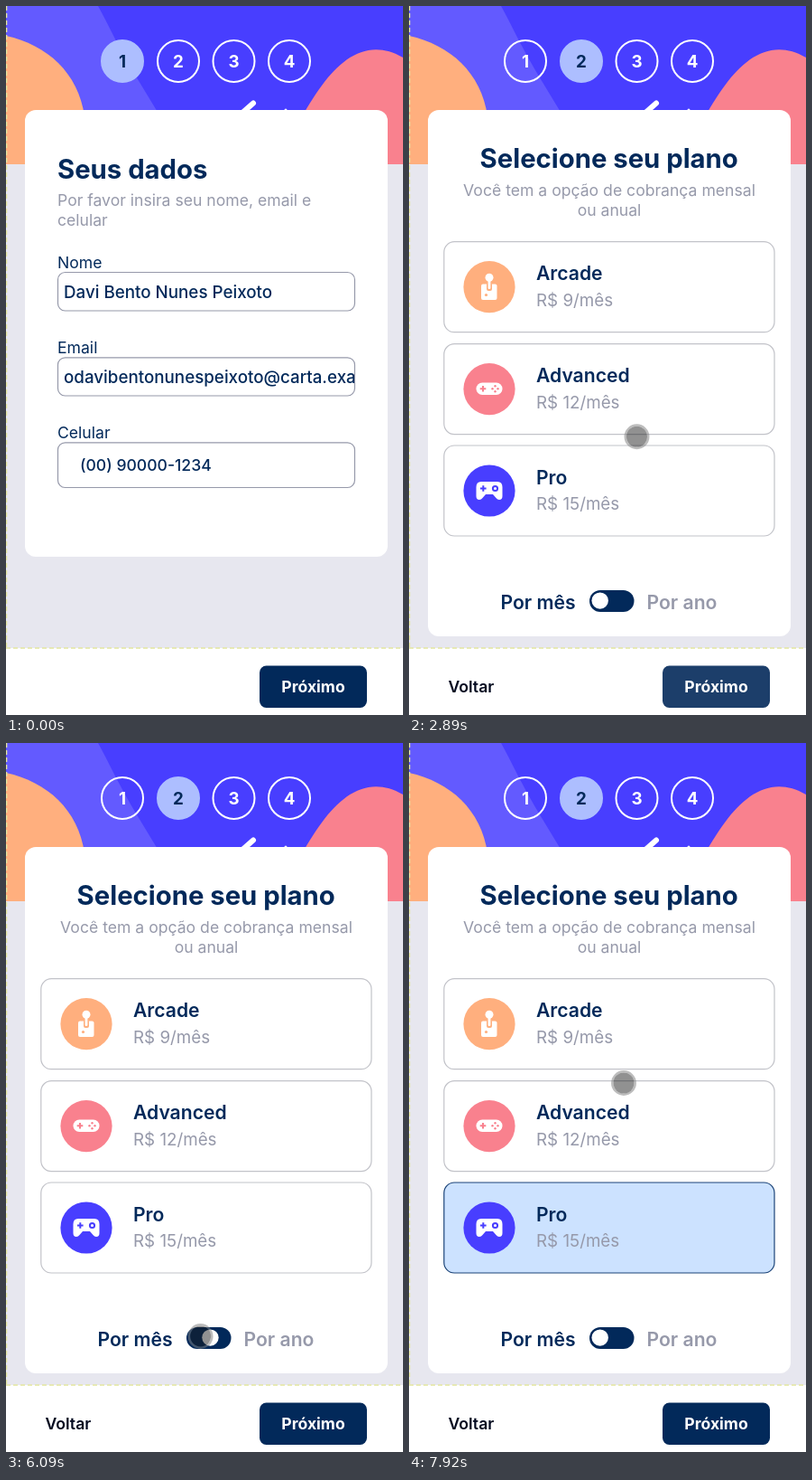
An HTML page with a canvas that plays this animation: 440 px wide and 784 px high, repeating every 8000 ms.

```html
<!DOCTYPE html>
<html lang="pt-BR">
<head>
<meta charset="utf-8">
<title>Cadastro</title>
<style>
html, body { margin: 0; width: 100%; height: 100%; overflow: hidden; background: #e7e7ef; }
canvas { display: block; width: 440px; height: 784px; }
</style>
</head>
<body>
<canvas id="stage" width="440" height="784"></canvas>
<script>
const ctx = document.getElementById('stage').getContext('2d');
const LOOP = 8000;
const NAVY = '#02295a', GRAY = '#9699aa', WHITE = '#fff';
const PEACH = '#ffaf7e', CORAL = '#f9818e', BLUE = '#483eff';

const T = { page: 1500, on: 5250, off: 6000, pick: 7400 };

// Pointer path: time, x, y
const PATH = [
  [0, 283, 800], [390, 252, 558], [630, 252, 558], [1170, 357, 744], [1260, 358, 740],
  [1480, 358, 740], [2250, 350, 737], [2350, 350, 737], [3050, 236, 427], [3170, 235, 421],
  [3690, 209, 531], [3970, 198, 562], [4050, 198, 559], [4750, 214, 648], [4850, 214, 648],
  [5130, 215, 656], [6490, 216, 656], [6880, 227, 535], [7240, 230, 519],
  [7360, 230, 519], [7920, 238, 376], [8000, 238, 376]
];

const clamp = v => Math.max(0, Math.min(1, v));
const ramp = (t, start, length) => {
  const p = clamp((t - start) / length);
  return p * p * (3 - 2 * p);
};
const mix = (a, b, p) => `rgb(${a.map((v, i) => Math.round(v + (b[i] - v) * p))})`;

function slope(i, k) {
  if (i < 1 || i > PATH.length - 2) return 0;
  const step = j => (PATH[j + 1][k] - PATH[j][k]) / (PATH[j + 1][0] - PATH[j][0]);
  const a = step(i - 1), b = step(i);
  return a * b > 0 ? 2 * a * b / (a + b) : 0;
}

// Monotone cubic interpolation
function along(t, k) {
  let i = 0;
  while (i < PATH.length - 2 && PATH[i + 1][0] <= t) i++;
  const a = PATH[i], b = PATH[i + 1], d = b[0] - a[0], p = (t - a[0]) / d, q = 1 - p;
  return a[k] * (1 + 2 * p) * q * q + b[k] * p * p * (3 - 2 * p)
    + d * p * q * (slope(i, k) * q - slope(i + 1, k) * p);
}

function text(str, x, y, size, weight = 400, color = NAVY, align = 'left') {
  ctx.font = `${weight} ${size}px Inter, sans-serif`;
  ctx.fillStyle = color;
  ctx.textAlign = align;
  ctx.fillText(str, x, y);
}

function paint(fill, stroke, width = 1.2) {
  if (fill) { ctx.fillStyle = fill; ctx.fill(); }
  if (stroke) { ctx.strokeStyle = stroke; ctx.lineWidth = width; ctx.stroke(); }
}

function box(x, y, x2, y2, r, fill, stroke, width) {
  ctx.beginPath();
  ctx.roundRect(x, y, x2 - x, y2 - y, r);
  paint(fill, stroke, width);
}

function disc(x, y, r, fill, stroke, width) {
  ctx.beginPath();
  ctx.arc(x, y, r, 0, Math.PI * 2);
  paint(fill, stroke, width);
}

function shape(path, fill, stroke, width) {
  const p = new Path2D(path);
  if (fill) { ctx.fillStyle = fill; ctx.fill(p); }
  if (stroke) { ctx.strokeStyle = stroke; ctx.lineWidth = width; ctx.stroke(p); }
}

function plus(x, y, r, color) {
  shape(`M${x - r} ${y}h${2 * r}M${x} ${y - r}v${2 * r}`, null, color, 2);
}

function backdrop() {
  ctx.fillStyle = '#e7e7ef';
  ctx.fillRect(0, 0, 440, 784);
  ctx.fillStyle = BLUE;
  ctx.fillRect(0, 0, 440, 175);
  shape('M0 0H102C112 18 126 48 146 81L203 175H0Z', '#635aff');
  shape('M0 33C46 43 80 74 87 122L92 175H0Z', PEACH);
  shape('M290 175C318 144 332 112 350 88C374 55 404 36 440 57V175Z', CORAL);
  ctx.lineCap = 'round';
  shape('M262 118L274 107.5', null, WHITE, 6);
  ctx.lineCap = 'butt';
  disc(310, 115, 1.5, WHITE);
}

function steps(active) {
  [129, 191, 252.5, 314].forEach((x, i) => {
    const on = i + 1 === active;
    disc(x, 61, 23, on ? '#adbeff' : null, on ? '#adbeff' : WHITE, 2);
    text(i + 1, x, 68, 18.77, 700, on ? NAVY : WHITE, 'center');
  });
}

function field(label, value, top, bottom, x, base, size) {
  text(label, 57, top - 4.5, 17.6);
  box(57.5, top, 386.5, bottom, 8, WHITE, GRAY);
  ctx.save();
  ctx.beginPath();
  ctx.rect(58, top, 328, bottom - top);
  ctx.clip();
  text(value, x, base, size, 500);
  ctx.restore();
}

function dataPage() {
  box(21, 115, 423, 609, 12, WHITE);
  text('Seus dados', 57, 191, 28.16 * 1.04, 700);
  text('Por favor insira seu nome, email e', 57, 221, 17.6, 400, GRAY);
  text('celular', 57, 243, 17.6, 400, GRAY);
  field('Nome', 'Davi Bento Nunes Peixoto', 294.5, 337, 64, 323, 18.77);
  field('Email', 'odavibentonunespeixoto@carta.example', 388.8, 431, 64, 417, 18.77);
  field('Celular', '(00) 90000-1234', 482.8, 532.5, 82, 514, 17.6);
}

function arcadeIcon() {
  box(80, 307.5, 97.5, 325, 2, WHITE);
  box(86, 306, 92, 315, 2, PEACH);
  box(87.6, 301, 90.4, 313, 1, WHITE);
  disc(89, 300.3, 4.5, WHITE);
  disc(85.5, 319.5, 1.6, PEACH);
}

function advancedIcon() {
  box(74.5, 416.5, 103.5, 430, 6.7, WHITE);
  plus(82, 423.2, 3.3, CORAL);
  for (const [dx, dy] of [[0, -3], [0, 3], [-3, 0], [3, 0]]) disc(95.5 + dx, 423.2 + dy, 1.2, CORAL);
}

function proIcon() {
  shape('M80 526H98Q103.5 526 103.5 532V542Q103.5 546 100 546Q98 546 96.5 544L93 540H85L81.5 544Q80 546 78 546Q74.5 546 74.5 542V532Q74.5 526 80 526Z', WHITE);
  plus(82.3, 533.5, 3.3, BLUE);
  disc(95.5, 533.5, 2.6, null, BLUE, 2);
}

const PLANS = [
  ['Arcade', 9, 260.7, PEACH, arcadeIcon],
  ['Advanced', 12, 373.6, CORAL, advancedIcon],
  ['Pro', 15, 486, BLUE, proIcon]
];

function planPage(t) {
  const yearly = t >= T.on && t < T.off;
  const picked = t >= T.pick;
  box(21, 115, 423, 697, 12, WHITE);
  text('Selecione seu plano', 221.7, 179, 28.16 * 1.04, 700, NAVY, 'center');
  text('Você tem a opção de cobrança mensal', 222, 210, 17.6, 400, GRAY, 'center');
  text('ou anual', 222, 232, 17.6, 400, GRAY, 'center');

  for (const [name, price, y, color, icon] of PLANS) {
    const on = picked && name === 'Pro';
    box(38.8, y, 405, y + 100, 11.5, on ? '#cce2ff' : WHITE, on ? '#1c4478' : '#c2c3c9');
    disc(89, y + 50, 28.6, color);
    icon();
    text(name, 141, y + 42.5, 21.12, 600);
    text(yearly ? `R$ ${price * 10}/ano` : `R$ ${price}/mês`, 141, y + 71, 18.77, 400, GRAY);
  }

  text('Por mês', 101.5, 667, 21.12, 600, yearly ? GRAY : NAVY);
  text('Por ano', 263.5, 667, 21.12, 600, yearly ? NAVY : GRAY);
  box(200, 646, 249.5, 670, 12, NAVY);
  const slide = ramp(t, T.on, 200) - ramp(t, T.off, 200);
  disc(211.7 + 26 * slide, 657.6, 9.2, WHITE);
}

function footer(t) {
  ctx.fillStyle = WHITE;
  ctx.fillRect(0, 710, 440, 74);
  ctx.setLineDash([5, 3]);
  shape('M0.5 0V710M0 710H440', null, '#e4e6a0', 1.6);
  ctx.setLineDash([]);
  if (t >= T.page) text('Voltar', 43.5, 759, 17.6, 600, '#02091f');
  const hover = ramp(t, T.page, 200) - ramp(t, T.on, 200);
  box(281, 729.5, 400, 776, 7.5, mix([2, 41, 90], [28, 62, 106], hover));
  text('Próximo', 340.5, 759, 17.6, 700, WHITE, 'center');
}

function pointer(t) {
  const x = along(t, 1), y = along(t, 2);
  disc(x, y, 11.5, 'rgba(25,25,25,.48)');
  disc(x, y, 12.7, null, 'rgba(128,128,128,.52)', 2.5);
}

function draw(t) {
  const second = t >= T.page;
  backdrop();
  steps(second ? 2 : 1);
  if (second) planPage(t); else dataPage();
  footer(t);
  pointer(t);
}

const start = performance.now();
function frame() {
  draw((performance.now() - start) % LOOP);
  requestAnimationFrame(frame);
}
draw(0);
requestAnimationFrame(frame);
</script>
</body>
</html>
```
